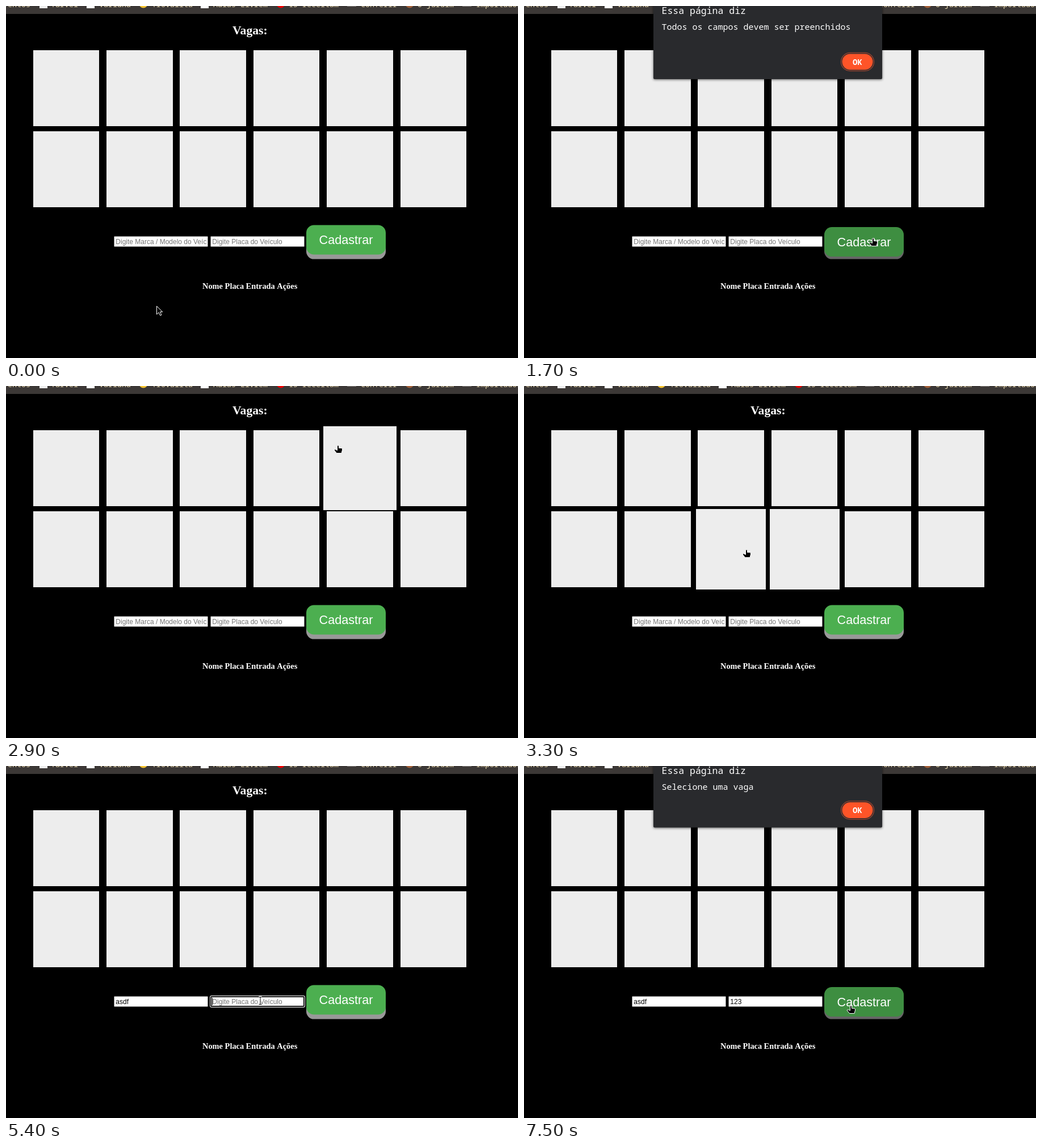
Recreate the animation shown at these times as an HTML page. Size 902 px wide and 621 px high, loop 8000 ms.

```html
<!DOCTYPE html>
<html lang="pt-BR">
<head>
<meta charset="utf-8">
<style>
html, body { margin: 0; width: 100%; height: 100%; overflow: hidden; background: #000; }
svg { display: block; }
text { white-space: pre; }
.serif { font-family: "Liberation Serif", serif; font-weight: bold; fill: #fff; }
.sans { font-family: "Liberation Sans", sans-serif; }
.mono { font-family: "Noto Sans Mono", monospace; fill: #fff; }
.modal { filter: drop-shadow(0 1px 2px rgba(0, 0, 0, .6)); }
</style>
</head>
<body>
<svg id="stage" width="902" height="621"></svg>
<script>
const stage = document.getElementById('stage');
const pen = document.createElement('canvas').getContext('2d');
pen.font = '12px "Liberation Sans", sans-serif';

const LOOP = 8000, STEP = 100;

// Pointer path: time, x, y
const path = [
  [0, 265, 529], [100, 277, 525], [400, 450, 472], [700, 602, 417], [800, 616, 412],
  [1600, 616, 412], [1700, 616, 410], [1900, 621, 350], [2200, 612, 185], [2400, 589, 112], [2500, 586, 105],
  [2900, 586, 105], [3400, 345, 335], [3600, 260, 415], [3900, 260, 415], [4200, 262, 426],
  [4600, 262, 426], [5000, 355, 441], [5300, 448, 414], [6100, 448, 414], [6600, 572, 424], [6700, 577, 425],
  [6800, 577, 425], [7000, 577, 423], [8000, 577, 423]
];

const slots = Array.from({ length: 12 }, (_, i) => ({
  x: 47.6 + 129.4 * (i % 6), y: i < 6 ? 78 : 221, w: 116.6, h: 134
}));
const button = { x: 529, y: 386.5, w: 140, h: 52 };
const fields = [
  { x: 190, y: 406, w: 166, h: 19, hint: 'Digite Marca / Modelo do Veículo' },
  { x: 360, y: 406, w: 166, h: 19, hint: 'Digite Placa do Veículo' }
];

const bookmarks = [ // text x, label, icon x, icon colour, icon shape
  [-13, 'eventos'], [79, 'Tarvel', 59, '#eee', 'square'], [164, 'Varluna', 142, '#fff', 'square'],
  [257, 'Trovalita', 235, '#f5c431', 'circle'], [365, 'Aulas Livre…', 343, '#fff', 'square'],
  [498, '15 receita…', 477, '#e00', 'circle'], [625, 'Conferir', 601, '#8b8785', 'folder'],
  [725, 'O jardi…', 704, '#a2603a', 'circle'], [828, 'Importados', 804, '#8b8785', 'folder']
];

const cursors = {
  arrow: '<path d="M.5 .5V15L4 11.7L6.7 17L9 16L6.4 10.7H10.8Z" fill="#000" stroke="#fff"/>',
  hand: '<path d="M-2.5 .5Q-1 -1 .5 .5V4.5H5Q7 5 6.5 8L5 13.5H-3.5L-8 8Q-7 6 -5.5 7L-2.5 8.5Z" fill="#000" stroke="#fff"/>',
  beam: ['#fff" stroke-width="3', '#000'].map(c =>
    `<path d="M-2.5 -6.5H2.5M0 -6.5V6.5M-2.5 6.5H2.5" fill="none" stroke="${c}"/>`).join('')
};

const inside = ([px, py], b) => px >= b.x && px <= b.x + b.w && py >= b.y && py <= b.y + b.h;
const rect = (x, y, w, h, fill, more = '') =>
  `<rect x="${x}" y="${y}" width="${w}" height="${h}" fill="${fill}" ${more}/>`;
const text = (x, y, size, kind, str, more = '') =>
  `<text x="${x}" y="${y}" font-size="${size}" class="${kind}" ${more}>${str}</text>`;

function pointer(t) {
  const i = Math.max(1, path.findIndex(k => k[0] >= t));
  const [t0, x0, y0] = path[i - 1], [t1, x1, y1] = path[i];
  const u = (t - t0) / (t1 - t0);
  return [x0 + (x1 - x0) * u, y0 + (y1 - y0) * u];
}

const modalOpen = t => t >= 1200 && t < 2600 || t >= 7300;
const hovers = (t, box) => t >= 0 && !modalOpen(t) && inside(pointer(t), box);

function drawBar() {
  return rect(0, 0, 902, 14, '#3c3836') + bookmarks.map(([x, label, ix, color, shape]) => {
    const icon = !shape ? '' : shape === 'circle'
      ? `<circle cx="${ix + 7}" cy="-4" r="7.5" fill="${color}"/>`
      : rect(ix, -10, shape === 'folder' ? 16 : 14, shape === 'folder' ? 11 : 14, color);
    return icon + text(x, 2, 13.33, 'mono', label, 'style="fill:#ebdbb2"');
  }).join('');
}

function drawSlot(s, t) {
  const grow = .055 * (hovers(t, s) + hovers(t - STEP, s));
  const dx = s.w * grow / 2, dy = s.h * grow / 2;
  const x = Math.round(s.x - dx), y = Math.round(s.y - dy);
  return rect(x, y, Math.round(s.x + s.w + dx) - x, Math.round(s.y + s.h + dy) - y, '#ededed');
}

function drawField(f, value, focused, caretOn) {
  const left = f.x + 3.3;
  const frame = focused
    ? rect(f.x - 1, f.y - 1, f.w + 2, f.h + 2, '#fff', 'rx="3"') +
      rect(f.x + 1, f.y + 1, f.w - 2, f.h - 2, '#fff', 'stroke="#101010" stroke-width="2" rx="1"')
    : rect(f.x + .5, f.y + .5, f.w - 1, f.h - 1, '#fff', 'stroke="#767676" rx="1"');
  const label = `<svg width="${f.x + f.w - 3}" height="621">` +
    text(left, 420, 12, 'sans', value || f.hint, `fill="${value ? '#000' : '#757575'}"`) + '</svg>';
  const caret = focused && caretOn
    ? rect(Math.round(left + pen.measureText(value).width - .3), 409, 1, 13, '#000') : '';
  return frame + label + caret;
}

function drawButton(hot, pressed) {
  const { x, y, w, h } = button, top = y + (pressed ? 3.6 : 0);
  return rect(x, top + (pressed ? 4.5 : 8.1), w, h, pressed ? '#666' : '#999', 'rx="13.5"') +
    rect(x, top, w, h, hot ? '#3e8e41' : '#4caf50', 'rx="13.5"') +
    text(x + w / 2, Math.round(top + 33.4), 21.6, 'sans', 'Cadastrar', 'fill="#fff" text-anchor="middle"');
}

function drawModal(message, bottom, opacity, hot) {
  const mid = bottom - 30.5;
  return `<g class="modal" opacity="${opacity}">` +
    rect(228, -20, 403, bottom + 20, '#292a2d', 'rx="2"') +
    text(242.5, 14, 16.5, 'mono', 'Essa página diz') +
    text(242.5, 42, 15, 'mono', message) +
    rect(558.5, mid - 16, 58, 32, 'none', 'rx="16" stroke="#8f4230" stroke-width="1.5"') +
    rect(560.5, mid - 14, 54, 28, hot ? '#ff6c42' : '#ff5428', 'rx="14"') +
    text(587.5, mid + 5, 14, 'mono', 'OK', 'text-anchor="middle" font-weight="600"') + '</g>';
}

function draw(t) {
  const pos = pointer(t), modal = modalOpen(t);
  const pressed = t >= 1000 && t < 2600 || t >= 6900;
  const hot = pressed || hovers(t, button);
  const model = 'asdf'.slice(0, t < 4400 ? 0 : t < 4500 ? 2 : 4);
  const plate = '123'.slice(0, Math.max(0, Math.floor((t - 5800) / 100)));
  const onField = !modal && fields.some(f => inside(pos, f));
  const onHand = inside(pos, button) || !modal && slots.some(s => inside(pos, s));
  const kind = onField ? 'beam' : onHand ? 'hand' : 'arrow';

  let out = drawBar() + text(399, 50, 21.6, 'serif', 'Vagas:');
  out += slots.map(s => drawSlot(s, t)).join('');
  out += drawField(fields[0], model, t >= 3800 && t < 5400, t < 4200 || t >= 4400);
  out += drawField(fields[1], plate, t >= 5400 && t < 6900, true);
  out += drawButton(hot, pressed);
  [[346, 'Nome'], [385.6, 'Placa'], [422.6, 'Entrada'], [477.3, 'Ações']]
    .forEach(([x, s]) => out += text(x, 499, 14.4, 'serif', s));
  if (modal) out += t < 2600
    ? drawModal('Todos os campos devem ser preenchidos', 129, t < 1300 ? .6 : 1,
        inside(pos, { x: 561, y: 84, w: 53, h: 29 }))
    : drawModal('Selecione uma vaga', 108.5, Math.min(1, (t - 7200) / 300), false);
  out += `<g transform="translate(${pos.map(Math.round)})">${cursors[kind]}</g>`;
  stage.innerHTML = out;
}

let last = -1;
function tick(now) {
  const t = Math.floor(now % LOOP / STEP) * STEP;
  if (t !== last) draw(last = t);
  requestAnimationFrame(tick);
}
draw(0);
requestAnimationFrame(tick);
</script>
</body>
</html>
```
